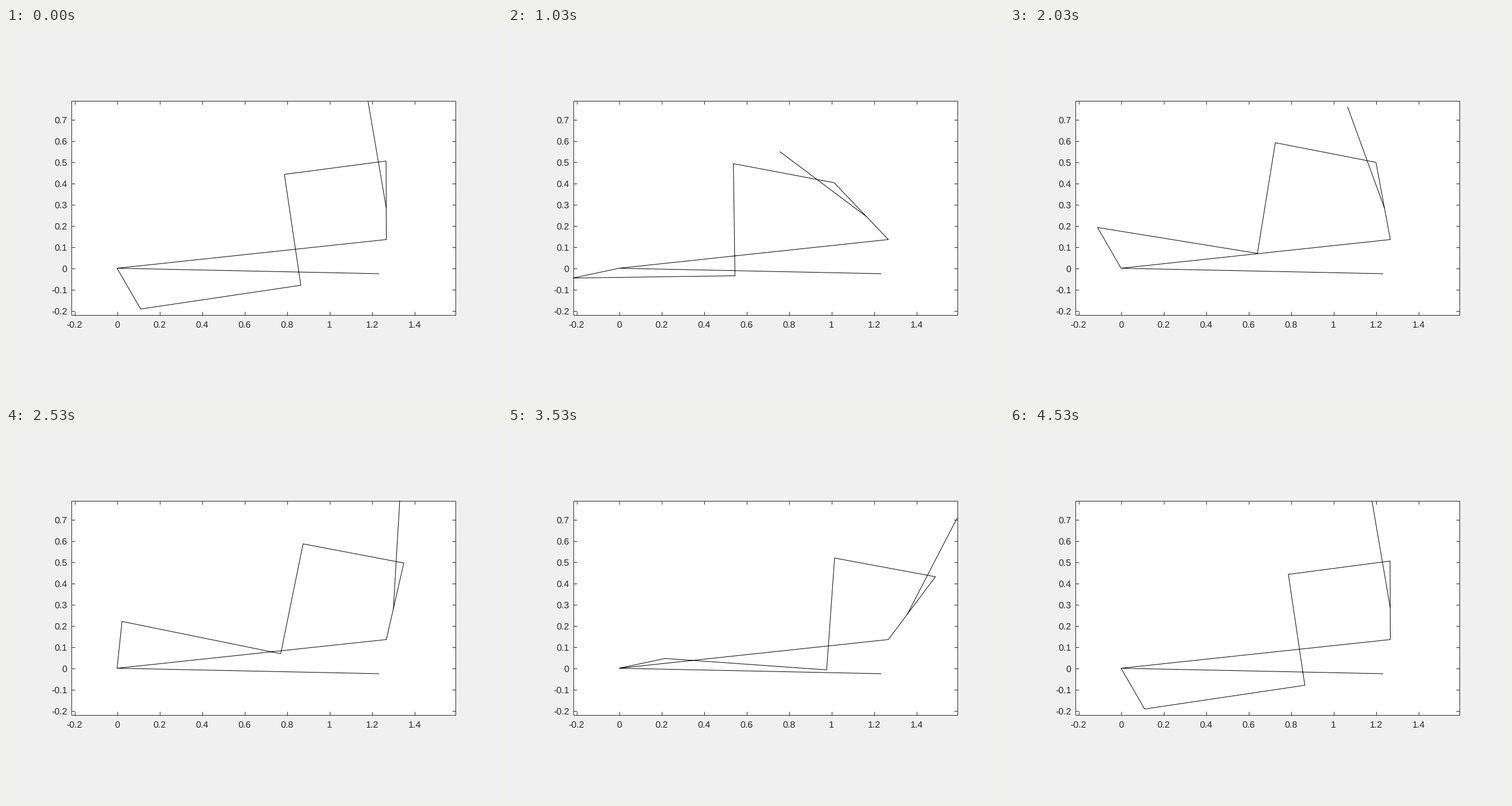
A matplotlib script that plays this animation: 864x648 px, repeating every 5.03 s.

```python
import math

import matplotlib.pyplot as plt
from matplotlib.animation import FuncAnimation
from matplotlib.collections import LineCollection
from matplotlib.lines import Line2D
from matplotlib.patches import Rectangle
from matplotlib.transforms import Affine2D

WIDTH, HEIGHT, DPI = 864, 648, 100
PIXEL = 72 / DPI
LOOP_MS, STEP_MS, FIRST_MS, TICK_MS = 5030, 500, 30, 10

LEFT, RIGHT, TOP, BOTTOM = 113, 782, 126, 499
SCALE = 370
TICK = 6
GREY = "#262626"

# Linkage in pixels, complex numbers with y upwards from the crank pivot.
ORIGIN_X, ORIGIN_Y = 193, 418
ROCKER_PIVOT = complex(469, 50)
SLIDE_PIVOT = complex(456, -9.5)
CRANK, SLIDER, ARM, LINK, ROCKER = 82, 282.1, 195.3, 178.65, 136.75
NEEDLE_BASE, NEEDLE, NEEDLE_ANGLE = 55.3, 188, math.radians(9.5)

plt.rcParams["font.family"] = "Liberation Sans"
plt.rcParams["text.hinting"] = "none"

fig = plt.figure(figsize=(WIDTH / DPI, HEIGHT / DPI), dpi=DPI,
                 facecolor="#f0f0f0")
to_stage = Affine2D().scale(1, -1).translate(0.5, HEIGHT - 0.5)


def unit(z):
    return z / abs(z)


def polar(length, angle):
    return length * complex(math.cos(angle), math.sin(angle))


def to_pixels(points):
    return [(ORIGIN_X + p.real, ORIGIN_Y - p.imag) for p in points]


def circle_meet(p, p_radius, q, q_radius):
    """Intersection of two circles on the left of the way from p to q."""
    gap = abs(q - p)
    along = (gap**2 + p_radius**2 - q_radius**2) / (2 * gap)
    height = math.sqrt(p_radius**2 - along**2)
    return p + unit(q - p) * complex(along, height)


def pose(angle):
    crank = polar(CRANK, angle)
    heading = unit(SLIDE_PIVOT - crank)  # the bar slides through a fixed point
    elbow = crank + SLIDER * heading
    tip = elbow + ARM * 1j * heading
    joint = circle_meet(tip, LINK, ROCKER_PIVOT, ROCKER)
    swing = unit(joint - ROCKER_PIVOT)
    base = ROCKER_PIVOT + NEEDLE_BASE * swing
    needle_tip = base + swing * polar(NEEDLE, NEEDLE_ANGLE)
    return ([SLIDE_PIVOT, 0j, crank, elbow, tip, joint, ROCKER_PIVOT, 0j],
            [base, needle_tip])


def label(x, y, value, align):
    fig.text(x, y, f"{value:g}", transform=to_stage, ha=align, va="baseline",
             size=16 * PIXEL, color=GREY)


def draw_axes():
    fig.add_artist(Rectangle((LEFT, TOP), RIGHT - LEFT, BOTTOM - TOP,
                             fc="white", ec=GREY, lw=PIXEL,
                             transform=to_stage))
    ticks = []
    for i in range(-1, 8):
        x = round(ORIGIN_X + SCALE * i / 5)
        ticks += [[(x, TOP), (x, TOP + TICK)],
                  [(x, BOTTOM), (x, BOTTOM - TICK)]]
        label(x, 521, i / 5, "center")
    for i in range(-2, 8):
        y = round(ORIGIN_Y - SCALE * i / 10)
        ticks += [[(LEFT, y), (LEFT + TICK, y)],
                  [(RIGHT, y), (RIGHT - TICK, y)]]
        label(106, y + 6, i / 10, "right")
    fig.add_artist(LineCollection(ticks, colors=GREY, linewidths=PIXEL,
                                  transform=to_stage))


def add_line():
    return fig.add_artist(Line2D([], [], color="black", lw=PIXEL,
                                 solid_joinstyle="round",
                                 transform=to_stage))


draw_axes()
lines = [add_line(), add_line()]


def update(frame):
    step = (frame * TICK_MS - FIRST_MS) // STEP_MS + 1
    for line, points in zip(lines, pose(math.radians(-60 - 36 * step))):
        line.set_data(*zip(*to_pixels(points)))
    return lines


anim = FuncAnimation(fig, update, frames=LOOP_MS // TICK_MS,
                     interval=TICK_MS, repeat=True, repeat_delay=0)
plt.show()
```
